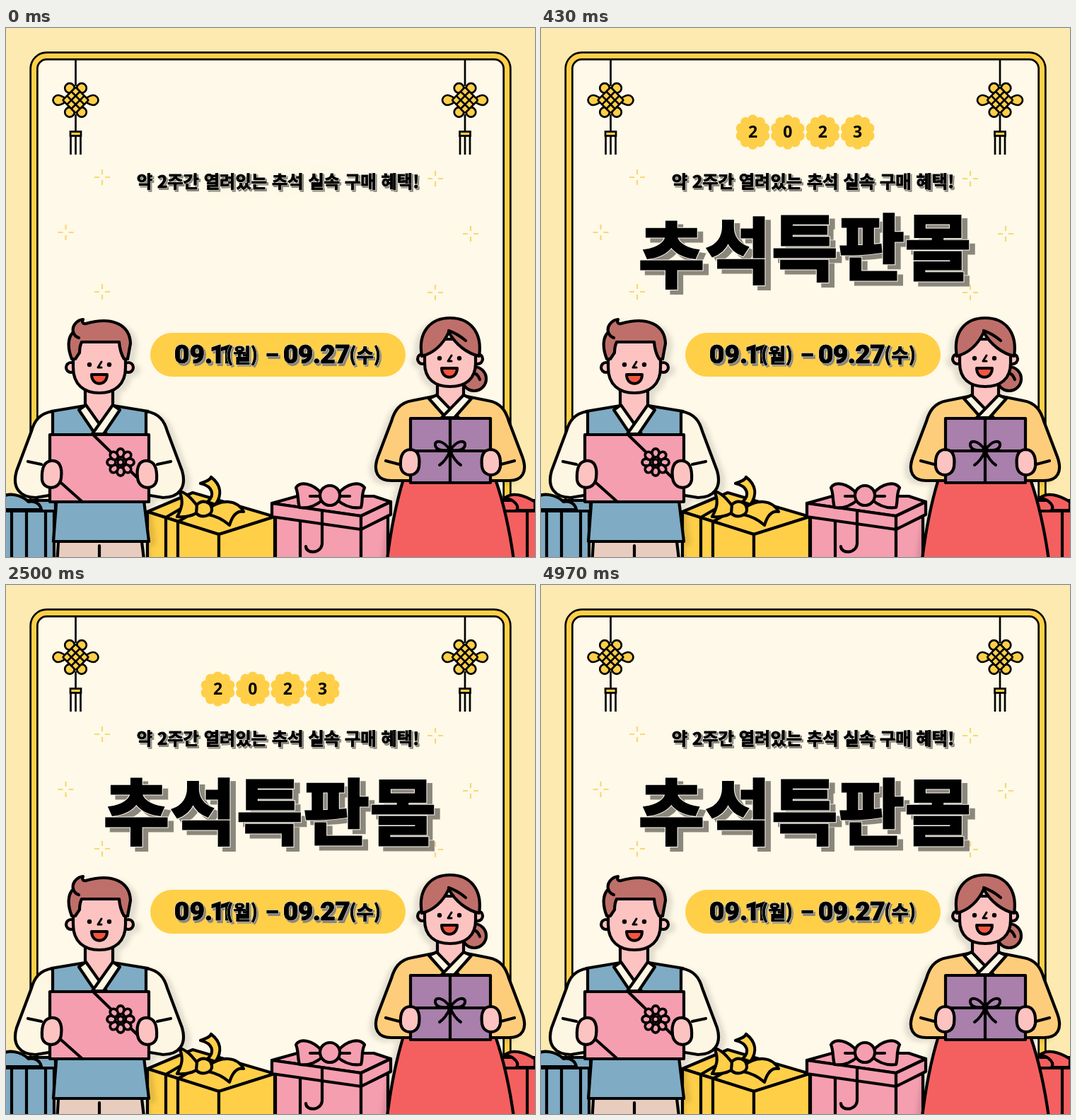
An HTML page that plays this animation: 748 by 748 pixels, repeating every 5.01 s.

```html
<!DOCTYPE html>
<html lang="ko">
<head>
<meta charset="utf-8">
<style>
html, body { margin: 0; width: 100%; height: 100%; overflow: hidden; background: #fdeab0; }
svg { display: block; width: 100vw; height: 100vh; }
.ink { stroke: #000; stroke-width: 4.2; stroke-linejoin: round; stroke-linecap: round; }
.ko { font-family: "Noto Sans CJK KR", "Noto Sans KR", sans-serif; font-weight: 900; }
.num { font-family: Roboto, sans-serif; font-weight: 900; }
.year { font: 600 23px "Noto Sans", sans-serif; }
</style>
</head>
<body>
<svg id="stage" viewBox="0 0 748 748"></svg>
<script>
const YELLOW = '#ffcf48', SKIN = '#fcc3c1', HAIR = '#bf6f69', CREAM = '#fdf6e3',
  BLUE = '#7fabc4', PINK = '#f59eaf', PURPLE = '#a97fab', RED = '#f4605f', GOLD = '#fdcd7b';

const path = (d, fill = 'none', extra = '') => `<path d="${d}" fill="${fill}" ${extra}/>`;
const dot = (x, y, r, fill, extra = '') => `<circle cx="${x}" cy="${y}" r="${r}" fill="${fill}" ${extra}/>`;
const box = (x, y, w, h, fill, extra = '') =>
  `<rect x="${x}" y="${y}" width="${w}" height="${h}" fill="${fill}" ${extra}/>`;
const group = (body, extra = '') => `<g ${extra}>${body}</g>`;
const ring = (n, fn) => Array.from({ length: n }, (_, i) => fn(i * 2 * Math.PI / n)).join('');
const pair = (body, axis) => body + group(body, `transform="matrix(-1 0 0 1 ${2 * axis} 0)"`);

// Black lettering with a thin light rim and a hard grey shadow
function letters(s, x, y, size, { cls = 'ko', dx = 2, dy = 2, bold = 1, rim = 1, extra = '' } = {}) {
  const layer = (ox, oy, color, width) =>
    `<text class="${cls}" x="${x + ox}" y="${y + oy}" font-size="${size}" fill="${color}" stroke="${color}"
      stroke-width="${width}" ${extra}>${s}</text>`;
  return layer(dx, dy, '#8b877c', bold + rim) + layer(0, 0, '#fffdf4', bold + rim) + layer(0, 0, '#000', bold);
}

function knot(x) {
  const petal = y => dot(-8.5, y, 6.8, YELLOW);
  const side = path('M-10 0C-17 -4 -20 -7 -25 -7C-29 -7 -32 -3 -32 0S-29 7 -25 7C-20 7 -17 4 -10 0z', YELLOW);
  const lattice = group(
    box(-13, -13, 26, 26, YELLOW, 'rx="2"') + path('M-4.3 -13V13M4.3 -13V13M-13 -4.3H13M-13 4.3H13'),
    'transform="rotate(45)"');
  return group(
    path('M0 -58V-20M0 20V46') + pair(side + petal(-17) + petal(17), 0) + lattice +
    path('M-7 50V77M0 50V77M7 50V77') + box(-7.5, 44.5, 15, 6, YELLOW),
    `transform="translate(${x} 102)" stroke="#000" stroke-width="2.7"`);
}

const sparkle = (x, y) => path(
  `M${x} ${y - 11}v7m0 8v7M${x - 11} ${y}h7m8 0h7`, 'none', 'stroke="#f8d877" stroke-width="2.2"');

const face = (x, y) =>
  dot(x - 14, y, 2.2, '#000', 'stroke-width="2"') + dot(x + 14, y, 2.2, '#000', 'stroke-width="2"') +
  path(`M${x + 3} ${y - 4}l-5 8h5`, 'none', 'stroke-width="3"') +
  path(`M${x - 11} ${y + 14}h22c0 17 -22 17 -22 0z`, '#f4553f', 'stroke-width="4"');

function gifts() {
  const blue =
    box(-20, 682, 88, 80, BLUE) + box(-20, 668, 90, 15, BLUE) + path('M8 683V748M29 683V748M56 683V748') +
    path('M-8 664C4 656 22 660 32 670C40 668 48 672 50 681H-8z', BLUE);
  const red =
    box(700, 682, 60, 80, RED) + box(700, 668, 60, 15, RED) + path('M737 683V748') +
    path('M706 664C716 656 732 660 748 670V682H722C726 676 720 668 706 664z', RED);
  const yellow =
    path('M200 684L264 657L380 691L301 716z', YELLOW) +
    path('M200 684L301 716V760H200z', YELLOW) + path('M301 716L380 691V760H301z', YELLOW) +
    path('M226 692V748M243 698V748M226 692L250 678M243 698L268 684') +
    path('M285 670C296 660 292 648 275 644C282 641 288 640 290 635C304 646 306 660 296 674z', YELLOW) +
    path('M272 678C262 664 252 656 245 655C252 670 248 680 242 691C254 692 264 690 272 684z', YELLOW) +
    path('M286 680C304 666 326 666 336 684C326 682 320 690 316 703C306 694 296 690 286 688z', YELLOW) +
    path('M270 674C278 666 290 670 291 680S276 694 269 686z', YELLOW);
  const pink =
    path('M381 690L502 708V760H381z', PINK) + path('M502 708L540 690V760H502z', PINK) +
    path('M376 672L412 662H520L544 670L502 690z', PINK) +
    path('M376 672L502 690V709L376 691z', PINK) + path('M502 690L544 670V688L502 709z', PINK) +
    path('M416 697V748M447 684V728C447 744 424 744 424 733') +
    path('M446 658C434 644 416 640 410 650C414 660 412 668 415 678C428 680 440 674 448 667z', PINK) +
    path('M470 658C482 644 500 640 507 650C502 660 505 668 502 678C488 680 476 674 468 667z', PINK) +
    path('M430 662L446 662M470 662L486 662') + dot(458, 661, 14, PINK);
  return group(blue + red + yellow + pink, 'class="ink"');
}

function man() {
  const arm =
    path('M66 542C47 545 40 556 36 570L15 626C8 650 20 664 42 664L66 660z', CREAM) + path('M31 613L50 617');
  const hand = path('M78 636C80 620 75 611 64 612C53 613 50 623 51 639C53 654 76 654 78 636z', SKIN);
  const flower = ring(8, a => group(
    `<ellipse cx="0" cy="-13" rx="5" ry="6" fill="${PINK}"/>`,
    `transform="translate(162 614) rotate(${a * 180 / Math.PI})" stroke-width="3.8"`));
  return group(
    path('M74 726H192L196 760H72z', '#e8cdbf') + path('M132 732V748') +
    path('M72 660H194L202 726H67z', BLUE) +
    path('M64 542L112 534H152L201 542V665H64z', BLUE) + pair(arm, 132) +
    path('M112 505H151V542L132 566L112 542z', SKIN) +
    path('M103 540L113 533L142 574H126z', CREAM) + path('M161 540L151 533L122 574H138z', CREAM) +
    dot(92, 480, 7, SKIN) + dot(173, 480, 7, SKIN) +
    path('M95 440V480C95 504 110 516 132 516S169 504 169 480V440z', SKIN) +
    path('M93 468C86 450 88 437 95 430C93 421 100 413 109 412C107 416 109 419 113 418C151 407 175 420 176 446L172 468L167 468Q161 458 160 444H107Q104 450 104 459L98 468z', HAIR) +
    path('M95 430Q97 436 103 438') + face(132, 476) +
    box(62, 575, 140, 95, PINK) + path('M124 576L192 642M62 629L108 670') +
    flower + dot(162, 614, 4, PINK, 'stroke-width="3"') + pair(hand, 132),
    'class="ink" style="filter:drop-shadow(8px 4px 3px #0000001c)"');
}

function woman() {
  const arm =
    path('M604 521L574 527C556 530 549 542 545 556L526 606C518 628 526 640 545 640H574L628 600V524z', GOLD) +
    path('M537 612L556 617');
  const hand = path('M584 620C586 603 581 596 571 596C560 597 557 606 558 620C560 636 582 636 584 620z', SKIN);
  return group(
    path('M562 638H692Q710 690 719 760H538Q546 690 562 638z', RED) +
    pair(arm, 628) +
    dot(662, 496, 17, HAIR) + path('M655 487Q666 486 670 497') +
    path('M610 498H647V526L628 544L610 526z', SKIN) +
    path('M598 524L609 519L640 551H622z', CREAM) + path('M658 524L647 519L616 551H634z', CREAM) +
    dot(589, 468, 7, SKIN) + dot(667, 468, 7, SKIN) +
    path('M592 440V474C592 496 606 507 628 507S664 496 664 474V440z', SKIN) +
    path('M588 464C582 430 600 410 628 410S674 430 669 464C652 460 636 448 626 430C618 448 604 460 588 464z', HAIR) +
    path('M626 428Q638 432 650 442') + face(627, 467) +
    box(572, 552, 113, 91, PURPLE) + path('M628 552V643M572 598H685') +
    pair(path('M628 597C618 582 606 582 607 590C608 598 618 598 628 597zM628 598Q622 612 613 618',
      PURPLE, 'stroke-width="4"'), 628) +
    dot(628, 597, 3, '#000') + pair(hand, 628.5),
    'class="ink" style="filter:drop-shadow(-7px 4px 3px #0000001c)"');
}

function badges() {
  return [...'2023'].map((digit, i) => {
    const x = 299.5 + i * 49.4;
    return dot(x, 147, 19, YELLOW) +
      ring(10, a => dot(x + 17.4 * Math.sin(a), 147 - 17.4 * Math.cos(a), 7.2, YELLOW)) +
      `<text class="year" x="${x}" y="154.5" text-anchor="middle">${digit}</text>`;
  }).join('');
}

const date = { cls: 'num', dx: 2.5, dy: 2.5 };
const middle = 'text-anchor="middle"';
const frame = 'rx="18" stroke-width=';

document.getElementById('stage').innerHTML =
  box(0, 0, 748, 748, '#fdeab0') +
  box(39.5, 39.5, 669, 760, '#fef9e8', frame + '"12.4" stroke="#000"') +
  box(39.5, 39.5, 669, 760, 'none', frame + `"7" stroke="${YELLOW}"`) +
  knot(98.5) + knot(649) +
  [[136, 211], [84.5, 289], [136, 373], [607, 213], [657, 291], [607, 374]].map(p => sparkle(...p)).join('') +
  gifts() + man() + woman() +
  box(204, 431, 361, 62, YELLOW, 'rx="31"') +
  letters('09.', 238, 474, 37, date) +
  letters('11', 288, 474, 37, { ...date, extra: 'letter-spacing="-8"' }) +
  letters('(월)', 311, 473, 27) +
  letters('–', 376, 472, 30, { ...date, extra: middle }) +
  letters('09.27', 392, 474, 37, { ...date, extra: 'letter-spacing="-.6"' }) +
  letters('(수)', 485, 473, 27) +
  letters('약 2주간 열려있는 추석 실속 구매 혜택!', 384.5, 226, 24.3, { extra: middle }) +
  group(badges(), 'id="badges"') +
  [...'추석특판몰'].map((c, i) => group(
    letters(c, 184.5 + i * 94.2, 358.5, 101.5, { dx: 7.5, dy: 6, bold: 3.2, rim: 2, extra: middle }),
    'class="title"')).join('');

const yearRow = document.getElementById('badges');
const title = document.querySelectorAll('.title');
const clamp = v => Math.min(1, Math.max(0, v));
const LOOP = 5010, start = performance.now();

function draw() {
  const t = (performance.now() - start) % LOOP;

  // Year row rises in, then leaves upward
  const enter = (1 - clamp(t / 500)) ** 3, leave = clamp((t - 3780) / 600) ** 3;
  yearRow.setAttribute('transform', `translate(0 ${70 * (enter - leave)})`);
  yearRow.setAttribute('opacity', 1 - enter - leave);

  // Title letters pop in one by one and drop into place
  title.forEach((letter, i) => {
    const age = t - 20 - i * 100;
    letter.setAttribute('visibility', age > 0 ? 'visible' : 'hidden');
    letter.setAttribute('transform', `translate(0 ${-11 * (1 - clamp(age / 400) ** 3)})`);
  });
  requestAnimationFrame(draw);
}
draw();
</script>
</body>
</html>
```
